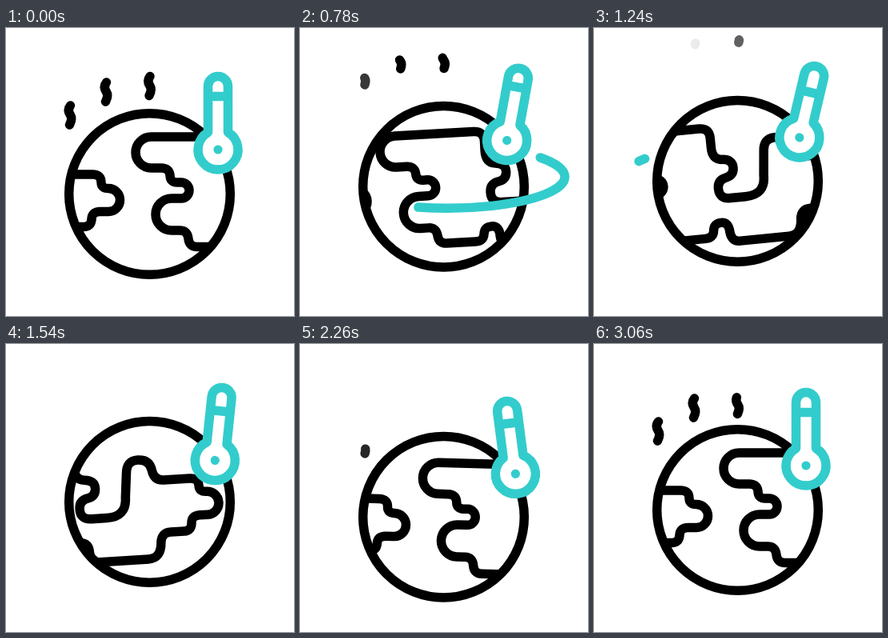
Write an HTML page that moves like this. It is 360 px wide and 360 px high and loops after 3080 ms.

```html
<!DOCTYPE html>
<html lang="en">
<head>
<meta charset="utf-8">
<title>Warming globe</title>
<style>
  html, body { margin: 0; width: 100%; height: 100%; overflow: hidden; background: #fff; }
  svg { display: block; width: 100vw; height: 100vh; }
  .line { fill: none; stroke: #000; stroke-width: 11.5; stroke-linecap: round; stroke-linejoin: round; }
  .teal { stroke: #3cc; }
  .solid { fill: #fff; }
</style>
</head>
<body>
<svg viewBox="0 0 360 360">
  <defs>
    <clipPath id="disc"><circle cx="179.5" cy="207.5" r="103"/></clipPath>
    <path id="land" d="M181.5 136H280q13 0 13 13v12q0 15 12 16q13 1 13 11q0 10-10 12q-11 2-11 13q0 13 14 13h19
      q25 0 25-24l3-30q1-16 15-16q15 0 17 14q2 13 14 13h32.5q11 0 11 10q0 7.5 9 7.5a14.5 14.5 0 0 1 0 29
      h-10q-11 0-11 10q-1 9-10 9H409q-12 0-13 12q-1 20-17 20H318q-11 0-12-12q0-13-10-13q-9 0-10 9q-1 9-11 9
      H239q-10 0-11-10q-1-10.5-11-10.5H207a20 20 0 0 1 0-40h12a10 10 0 0 0 0-20h-5q-9 0-9-9q-1-9-11-9
      h-12.5a19.5 19.5 0 0 1 0-39z"/>
  </defs>
  <g id="smoke"></g>
  <g id="globe">
    <g clip-path="url(#disc)">
      <g id="map" class="line">
        <use href="#land" x="-328.5"/>
        <use href="#land"/>
        <use href="#land" x="328.5"/>
      </g>
    </g>
    <circle class="line" cx="179.5" cy="207.5" r="100.8"/>
  </g>
  <path id="orbit" class="line teal"/>
  <g id="thermo">
    <path class="line teal solid" d="M252.5 130.4V73a12.5 12.5 0 0 1 25 0V130.4A25 25 0 1 1 252.5 130.4z"/>
    <path id="level" class="line teal" d="M253 85.5H277"/>
    <circle cx="265" cy="152" r="5.6" fill="#3cc"/>
  </g>
</svg>
<script>
const LOOP = 3080, TURN = 328.5;
const $ = id => document.getElementById(id);
const clamp = v => Math.min(1, Math.max(0, v));
const ease = u => (1 - Math.cos(Math.PI * clamp(u))) / 2;

// Smooth curve from 0 at the start through [time, value] points, flat at every extreme.
function track(...keys) {
  const points = [[0, 0], ...keys, [LOOP, keys.at(-1)[1]]];
  const rise = (a, b) => (b[1] - a[1]) / (b[0] - a[0]);
  const slopes = points.map((p, i) => {
    if (!i || i === points.length - 1) return 0;
    const a = rise(points[i - 1], p), b = rise(p, points[i + 1]);
    return a * b <= 0 ? 0 : 2 * a * b / (a + b);
  });
  return t => {
    const i = points.findLastIndex(p => p[0] <= t);
    const [t0, v0] = points[i], [t1, v1] = points[i + 1];
    const h = t1 - t0, u = (t - t0) / h, w = 1 - u;
    return v0 * (1 + 2 * u) * w * w + v1 * u * u * (3 - 2 * u)
      + h * u * w * (slopes[i] * w - slopes[i + 1] * u);
  };
}

const globeY = track([460, -3], [1200, -16.2], [1860, -1], [2320, 9], [2900, 0]);
const thermoY = track([150, 0], [1115, -15], [2210, 10.8], [2860, 0]);
const spin = track([460, -20.5], [1240, -142], [1860, -271.5], [2360, -343], [2860, -TURN]);
const mapY = track([780, 5], [1860, -3.5], [2300, 4], [2860, 0]);
const level = track([460, -7], [1240, 8.5], [1860, 0], [2300, 3], [2860, 0]);

const wisps = [[80.5, 97], [125.5, 68], [180, 60.5]].map(([x, y]) => {
  const el = document.createElementNS("http://www.w3.org/2000/svg", "path");
  el.setAttribute("class", "line");
  el.setAttribute("pathLength", 1);
  el.setAttribute("d", `M${x} ${y}c-4 5-2 9 0 12s2 6-1 12`);
  $("smoke").append(el);
  return el;
});

// Each wisp shrinks away upwards, then grows back from below, a little after the one before.
function drawWisp(el, i, t) {
  const back = 2040 + 220 * i, leaving = t < back;
  const p = leaving ? ease((t - 120) / (1060 + 160 * i)) : ease((t - back) / 780);
  const size = 0.05 + 0.95 * (leaving ? 1 - p : p);
  const alpha = leaving ? 1 - (t - 700 - 200 * i) / 370 : (t - back) / 260;
  el.setAttribute("transform", `translate(0 ${leaving ? -68 * p : 24 * (1 - p)})`);
  el.setAttribute("opacity", clamp(alpha));
  el.setAttribute("stroke-dasharray", `${size} 2`);
  el.setAttribute("stroke-dashoffset", 0.8 * (size - 1));
}

function drawOrbit(t) {
  const angle = u => (-38 + 253 * ease(u)) * Math.PI / 180;
  const tail = angle((t - 770) / 520), head = angle((t - 495) / 530);
  const point = a => `${184 + 147 * Math.cos(a)} ${186 + 39.3 * Math.sin(a)}`;
  const wide = head - tail > Math.PI ? 1 : 0;
  $("orbit").setAttribute("d", head - tail > 0.002
    ? `M${point(tail)}A147 39.3 0 ${wide} 1 ${point(head)}` : "");
}

function draw(t) {
  const gy = globeY(t), ty = thermoY(t);
  const tilt = gy * (gy < 0 ? 0.35 : 0.17);
  const lean = -ty * (ty < 0 ? 0.95 : 0.7);
  $("globe").setAttribute("transform", `translate(0 ${gy})`);
  $("map").setAttribute("transform",
    `translate(0 ${mapY(t)}) rotate(${tilt} 179.5 207.5) translate(${spin(t)} 0)`);
  $("thermo").setAttribute("transform",
    `translate(${-ty * 0.07} ${ty}) rotate(${lean} 265 112.5)`);
  $("level").setAttribute("transform", `translate(0 ${level(t)})`);
  wisps.forEach((el, i) => drawWisp(el, i, t));
  drawOrbit(t);
}

const began = performance.now();
function tick() {
  draw((performance.now() - began) % LOOP);
  requestAnimationFrame(tick);
}
tick();
</script>
</body>
</html>
```
